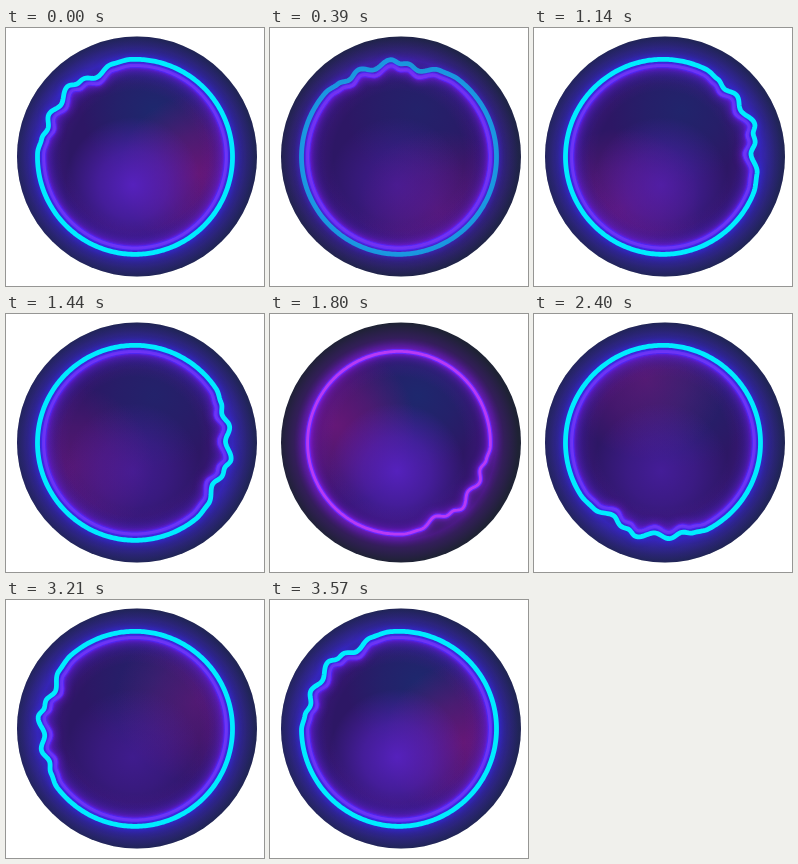
Write an HTML page with a canvas that moves like this. It is 258x258 px and loops after 3.6 s.

```html
<!DOCTYPE html>
<html lang="en">
<head>
<meta charset="utf-8">
<title>Neon ring</title>
<style>
  html, body { margin: 0; width: 100%; height: 100%; overflow: hidden; background: #fff; }
  canvas { display: block; width: 258px; height: 258px; }
</style>
</head>
<body>
<canvas id="stage" width="258" height="258"></canvas>
<script>
const ctx = document.getElementById('stage').getContext('2d');
const LOOP = 3600, TAU = Math.PI * 2;
const CX = 129, CY = 128.8, R = 97.5;

// Ripple along the ring: [degrees, radial offset]
const ripple = [
  [182, 0], [191, -2.5], [198, -6], [206, -1.5], [215, -7], [226, 0],
  [232, -4.5], [236, -4], [244, -9.5], [256, -2], [268, 0]
];

// Cyan tube brightness over one flicker: [phase, opacity]
const flicker = [[0, 1], [0.2, 1], [0.5, 0], [0.67, 1], [1, 1]];

const smooth = k => (1 - Math.cos(k * Math.PI)) / 2;

function sample(table, x, ease = k => k) {
  for (let i = 1; i < table.length; i++) {
    const [x0, y0] = table[i - 1], [x1, y1] = table[i];
    if (x >= x0 && x <= x1) return y0 + (y1 - y0) * ease((x - x0) / (x1 - x0));
  }
  return 0;
}

function ringPath(radius, turn) {
  const path = new Path2D();
  for (let d = 0; d < 360; d++) {
    const r = radius + sample(ripple, d, smooth);
    const a = (d + turn) * TAU / 360;
    path.lineTo(CX + r * Math.cos(a), CY + r * Math.sin(a));
  }
  path.closePath();
  return path;
}

function blob(x, y, r, rgb, alpha) {
  const g = ctx.createRadialGradient(x, y, 0, x, y, r);
  g.addColorStop(0, `rgba(${rgb},${alpha})`);
  g.addColorStop(0.5, `rgba(${rgb},${alpha * 0.6})`);
  g.addColorStop(1, `rgba(${rgb},0)`);
  ctx.fillStyle = g;
  ctx.fillRect(0, 0, 258, 258);
}

// Soft radial band around the ring
function halo(rgb, alpha, inner, outer) {
  const r0 = R - inner, r1 = R + outer;
  const g = ctx.createRadialGradient(CX, CY, r0, CX, CY, r1);
  const mid = inner / (r1 - r0);
  g.addColorStop(0, `rgba(${rgb},0)`);
  g.addColorStop(mid * 0.6, `rgba(${rgb},${alpha * 0.35})`);
  g.addColorStop(mid, `rgba(${rgb},${alpha})`);
  g.addColorStop(mid + (1 - mid) * 0.35, `rgba(${rgb},${alpha * 0.5})`);
  g.addColorStop(1, `rgba(${rgb},0)`);
  ctx.fillStyle = g;
  ctx.fillRect(0, 0, 258, 258);
}

function tube(path, color, width, glow, blur) {
  ctx.strokeStyle = color;
  ctx.lineWidth = width;
  ctx.shadowColor = glow;
  ctx.shadowBlur = blur;
  ctx.stroke(path);
  ctx.shadowBlur = 0;
}

function core(t, turn, path) {
  const pulse = Math.cos(t / 900 * TAU);
  const a = (turn + 15) * TAU / 360;
  ctx.save();
  ctx.clip(path);
  ctx.fillStyle = '#2d1765';
  ctx.fillRect(0, 0, 258, 258);
  blob(148, 82, 72, '26,44,112', 0.65 + 0.15 * pulse);
  blob(CX + 66 * Math.cos(a), CY + 66 * Math.sin(a), 80, '122,24,126', 0.6 + 0.12 * pulse);
  blob(127, 157, 68, '88,34,196', 0.66 + 0.26 * pulse);
  ctx.restore();
}

function draw(t) {
  const turn = t / LOOP * 360;
  const lit = sample(flicker, t % 1200 / 1200);
  const outer = ringPath(R, turn), inner = ringPath(R - 6.1, turn);

  ctx.clearRect(0, 0, 258, 258);
  ctx.save();
  ctx.beginPath();
  ctx.arc(131, 128.5, 120, 0, TAU);
  ctx.clip();
  ctx.fillStyle = '#1e2234';
  ctx.fillRect(0, 0, 258, 258);

  core(t, turn, inner);
  halo('108,20,190', 0.55, 32, 22);
  tube(inner, '#4a2cff', 5, '#8a1cff', 10);
  tube(inner, '#b83af4', 2.8, '#a020ff', 4);

  ctx.globalAlpha = lit;
  halo('42,46,215', 0.6, 24, 42);
  tube(inner, '#7636f8', 3, '#4a24f0', 3);
  tube(outer, '#00ecff', 4.8, 'rgba(40,44,230,0.8)', 7);
  ctx.restore();
}

function tick() {
  draw(performance.now() % LOOP);
  requestAnimationFrame(tick);
}
tick();
</script>
</body>
</html>
```
